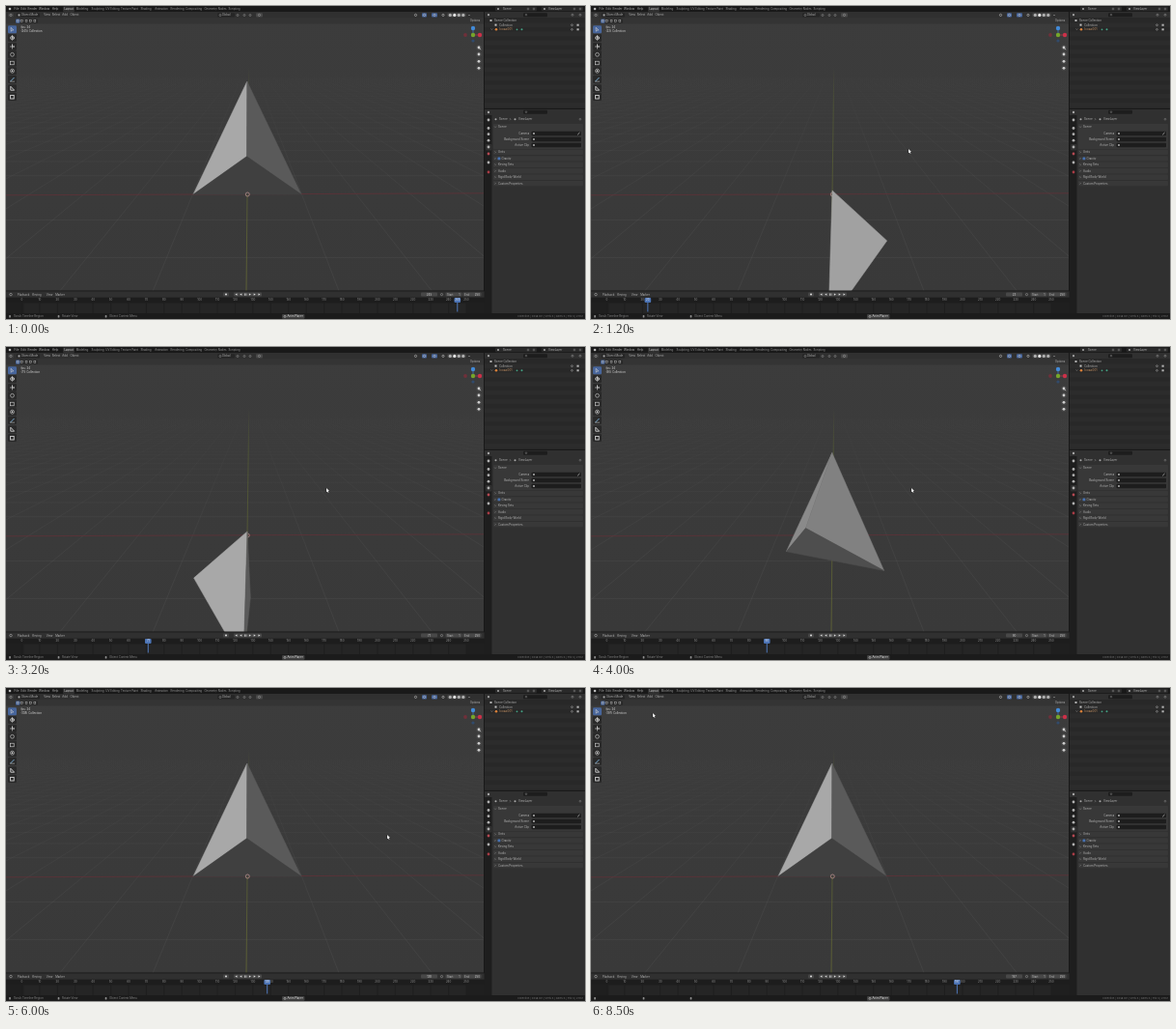
Recreate the animation shown at these times as an HTML page with a canvas. Size 600 by 324 pixels, loop 8.6 s.

```html
<!DOCTYPE html>
<html lang="en">
<head>
<meta charset="utf-8">
<title>Spinning pyramid in a 3D editor</title>
<style>
  html, body { margin: 0; width: 100%; height: 100%; overflow: hidden; background: #1b1b1b; }
  canvas { display: block; width: 600px; height: 324px; }
</style>
</head>
<body>
<canvas id="stage" width="600" height="324"></canvas>
<script>
const ctx = document.getElementById('stage').getContext('2d');
const LOOP = 8600, STEP = 100;
const FOCAL = 344, PITCH = 16 * Math.PI / 180;
const SIN = Math.sin(PITCH), COS = Math.cos(PITCH);

// ---------- drawing helpers ----------
const grey = v => `rgb(${v},${v},${v})`;

function box(x, y, w, h, color, radius = 0) {
  ctx.fillStyle = color;
  ctx.beginPath();
  ctx.roundRect(x, y, w, h, radius);
  ctx.fill();
}

function dot(x, y, r, color) {
  ctx.fillStyle = color;
  ctx.beginPath();
  ctx.arc(x, y, r, 0, 7);
  ctx.fill();
}

function ring(x, y, r, color, width = 0.6) {
  ctx.strokeStyle = color;
  ctx.lineWidth = width;
  ctx.beginPath();
  ctx.arc(x, y, r, 0, 7);
  ctx.stroke();
}

function line(points, color, width = 0.6) {
  ctx.strokeStyle = color;
  ctx.lineWidth = width;
  ctx.beginPath();
  points.forEach(([x, y]) => ctx.lineTo(x, y));
  ctx.stroke();
}

function text(str, x, y, color = '#b4b4b4', align = 'left', size = 2.9) {
  ctx.font = `${size}px Inter, "DejaVu Sans", sans-serif`;
  ctx.textAlign = align;
  ctx.textBaseline = 'middle';
  ctx.fillStyle = color;
  ctx.fillText(str, x, y);
}

// Each item is [label, centre x]
const labels = (items, y, color) => items.forEach(([str, x]) => text(str, x, y, color, 'center'));

// ---------- scene ----------
// x right, y up, z towards the viewer, measured from the 3D cursor
function project([x, y, z]) {
  const k = FOCAL / (FOCAL - y * SIN - z * COS);
  return [252 + (x - 2) * k, 152 - (y * COS - z * SIN - 43) * k];
}

const apex = [0, 114.6, 0], left = [-56, 0, 0], right = [56, 0, 0], front = [0, 58.5, 58.5];
const faces = [
  { points: [apex, left, front], azimuth: -65 },
  { points: [apex, front, right], azimuth: 65 },
  { points: [apex, right, left], azimuth: 180 },
  { points: [left, right, front], under: true },
];

function shade(face, yaw) {
  if (face.under) return 64 + 36 * Math.abs(Math.sin(yaw * Math.PI / 180));
  const facing = Math.cos((face.azimuth + yaw + 25) * Math.PI / 180);
  return Math.min(168, 90 + 103 * Math.max(0, facing));
}

function drawPyramid(frame) {
  const active = Math.min(frame, 96);
  const yaw = active * 3.75, angle = yaw * Math.PI / 180;
  const drop = 115 * (1 - Math.abs(1 - (active % 48) / 24));
  const place = ([x, y, z]) => project([
    x * Math.cos(angle) + z * Math.sin(angle),
    y - drop,
    z * Math.cos(angle) - x * Math.sin(angle),
  ]);
  for (const face of faces) {
    const [a, b, c] = face.points.map(place);
    const turn = (b[0] - a[0]) * (c[1] - a[1]) - (b[1] - a[1]) * (c[0] - a[0]);
    if (turn >= 0) continue;
    ctx.fillStyle = grey(Math.round(shade(face, yaw)));
    ctx.beginPath();
    [a, b, c].forEach(p => ctx.lineTo(...p));
    ctx.closePath();
    ctx.fill();
    ctx.strokeStyle = ctx.fillStyle;
    ctx.lineWidth = 0.5;
    ctx.stroke();
  }
}

function drawGround() {
  const fade = ctx.createLinearGradient(0, 62, 0, 230);
  fade.addColorStop(0, 'rgba(88,88,88,0)');
  fade.addColorStop(0.35, 'rgba(88,88,88,0.18)');
  fade.addColorStop(1, 'rgba(88,88,88,0.45)');
  for (let n = -36; n <= 36; n++) {
    const p = n * 56.5;
    if (n) line([project([p, 0, -2600]), project([p, 0, 270])], fade, 0.6);
    if (n && p < 270) line([project([-2600, 0, p]), project([2600, 0, p])], fade, 0.6);
  }
  line([[0, 195.8], [495, 193.8]], '#603238', 0.8);
  const green = ctx.createLinearGradient(0, 62, 0, 295);
  green.addColorStop(0, 'rgba(92,102,48,0)');
  green.addColorStop(0.2, 'rgba(92,102,48,0.65)');
  green.addColorStop(1, 'rgba(104,108,52,0.95)');
  line([[251.8, 62], [250, 195], [249, 295]], green, 0.8);
}

function drawCursor3D() {
  ring(250.3, 195, 2, '#c0b4b0', 0.6);
  ctx.setLineDash([1, 1]);
  ring(250.3, 195, 2, '#a84a48', 0.5);
  ctx.setLineDash([]);
}

function drawViewport(frame) {
  ctx.save();
  ctx.beginPath();
  ctx.rect(0, 6, 495, 289);
  ctx.clip();
  const back = ctx.createLinearGradient(0, 6, 0, 295);
  back.addColorStop(0, '#3c3c3c');
  back.addColorStop(1, '#393939');
  ctx.fillStyle = back;
  ctx.fillRect(0, 6, 495, 289);
  drawGround();
  const resting = frame >= 96;
  if (!resting) drawCursor3D();
  drawPyramid(frame);
  if (resting) drawCursor3D();
  ctx.restore();
}

// ---------- interface ----------
function drawViewportUI(frame) {
  box(0, 6, 495, 6.5, '#303030');
  box(0, 12.5, 495, 6, 'rgba(48,48,48,0.65)');
  box(2, 7.3, 6, 4.2, '#3c3c3c', 1);
  ring(5, 9.4, 1.1, '#b0b0b0', 0.5);
  box(11, 7.3, 24, 4.2, '#252525', 1);
  box(12.5, 8.4, 2, 2, '#a8a8a8');
  labels([['Object Mode', 24.5], ['View', 42.5], ['Select', 52], ['Add', 61], ['Object', 71]], 9.5);
  box(219, 7.3, 18, 4.2, '#262626', 1);
  text('Global', 228, 9.5, '#b4b4b4', 'center');
  for (const x of [222, 240, 247, 253]) ring(x, 9.5, 1, '#9a9a9a', 0.5);
  box(259, 7.3, 7, 4.2, '#484848', 1);
  ring(262.5, 9.4, 1.1, '#aaa', 0.5);

  box(431, 7.3, 5, 4.2, '#47659b', 1);
  box(441, 7.3, 6, 4.2, '#47659b', 1);
  for (const x of [424.5, 433.5, 444, 453]) ring(x, 9.4, 1.1, '#c4c4c4', 0.6);
  box(457.5, 7.3, 19, 4.2, '#484848', 1);
  for (let i = 0; i < 4; i++) dot(460.3 + i * 4.5, 9.4, 1.6, i === 1 ? '#e6e6e6' : '#b0b0b0');
  line([[479, 9], [480, 10], [481, 9]], '#aaa', 0.5);
  text('Options', 486, 15.5, '#b4b4b4', 'center');

  box(10, 13.5, 23, 4.2, '#272727', 1);
  box(10, 13.5, 4.5, 4.2, '#47659b', 1);
  for (let i = 0; i < 5; i++) {
    ctx.strokeStyle = '#b8b8b8';
    ctx.lineWidth = 0.5;
    ctx.strokeRect(11.3 + i * 4.4, 14.6, 1.9, 1.9);
  }
  text('fps: 24', 15.5, 22.2, '#dedede');
  text(`(${frame}) Collection`, 15.5, 26.4, '#dedede');

  // Tool shelf
  [24.3, 33, 42, 50.3, 58.8, 67.2, 76, 85.2, 94].forEach((y, i) => {
    box(2, y - 4, 9, 8, i ? '#292929' : '#47659b', 1.3);
    const bright = '#d4d4d4';
    if (i === 0) line([[5, y - 2], [7.8, y + 0.6], [6.3, y + 0.7], [5.3, y + 2], [5, y - 2]], bright);
    else if (i === 1 || i === 3) ring(6.5, y, 1.9, bright);
    if (i === 1 || i === 2) line([[4, y], [9, y], [6.5, y], [6.5, y - 2.5], [6.5, y + 2.5]], bright);
    if (i === 4 || i === 8) {
      ctx.strokeStyle = bright;
      ctx.strokeRect(4.6, y - 1.6, 3.6, 3.6);
    }
    if (i === 5) { ring(6.5, y, 2, bright); dot(6.5, y, 0.9, bright); }
    if (i === 6) line([[4.6, y + 2], [8.5, y - 2]], '#79a9cf', 1);
    if (i === 6) line([[4, y + 2.2], [9, y + 2.2]], bright, 0.5);
    if (i === 7) line([[4.8, y - 2], [4.8, y + 2], [8.6, y + 2], [4.8, y - 2]], bright, 0.9);
  });

  // Navigation gizmo
  line([[484, 30], [484, 23]], '#3f76b9', 0.8);
  line([[484, 30], [491, 30]], '#a93648', 0.8);
  dot(476, 30, 1.9, '#70303a');
  dot(484, 36, 1.6, '#314b6c');
  dot(484, 23, 2.2, '#438bd8');
  dot(491, 30, 2.2, '#cb3149');
  dot(484, 30, 2.2, '#76a52b');
  for (const y of [43, 50, 57.3, 64.3]) {
    dot(490, y, 3, '#454545');
    dot(490, y, 1.4, '#d0d0d0');
  }
  line([[490.5, 43.5], [492, 45.3]], '#d0d0d0', 0.8);
}

function drawTopBar() {
  box(0, 0, 600, 6, '#191919');
  dot(4, 3, 1.3, '#b9b9b9');
  labels([['File', 11], ['Edit', 18], ['Render', 27.5], ['Window', 39.5], ['Help', 51]], 3);
  box(59, 0.6, 12, 5.4, '#303030', 1);
  text('Layout', 65, 3.2, '#e3e3e3', 'center');
  labels([['Modeling', 79], ['Sculpting', 95], ['UV Editing', 110.5], ['Texture Paint', 128],
    ['Shading', 145], ['Animation', 161], ['Rendering', 177.5], ['Compositing', 194.5],
    ['Geometry Nodes', 217], ['Scripting', 236.5]], 3.2, '#969696');
  box(507, 0.8, 43, 4.4, '#292929', 1);
  box(555, 0.8, 43, 4.4, '#292929', 1);
  dot(510, 3, 1, '#aaa');
  dot(558, 3, 1, '#aaa');
  text('Scene', 515, 3);
  text('ViewLayer', 562, 3);
  for (const x of [541, 547, 589, 595]) ring(x, 3, 0.9, '#8c8c8c', 0.5);
}

function drawOutliner() {
  box(496, 6, 104, 100, '#282828');
  for (let y = 17.4; y < 104; y += 9.2) box(496, y, 104, 4.6, '#2c2c2c');
  box(496, 6, 104, 6, '#303030');
  dot(500, 9.2, 1.1, '#a6a6a6');
  box(536, 7.2, 25, 4, '#1d1d1d', 1);
  ring(539, 9.1, 0.8, '#888', 0.5);
  ring(587, 9.2, 1, '#a0a0a0', 0.5);
  ring(595, 9.2, 1, '#a0a0a0', 0.5);
  box(501.5, 14, 2, 2, '#b5b5b5');
  text('Scene Collection', 506, 15.1);
  box(506.5, 18.6, 2, 2, '#c5c5c5');
  text('Collection', 511, 19.7);
  line([[502.5, 23.5], [503.4, 24.5], [504.3, 23.5]], '#999', 0.5);
  dot(508, 24.3, 1.3, '#db8139');
  text('Icosa.001', 511.5, 24.4, '#d29a68');
  dot(529.5, 24.3, 0.9, '#43a385');
  dot(534.5, 24.3, 1, '#43a385');
  for (const y of [19.7, 24.3]) {
    ring(586.5, y, 0.9, '#b5b5b5', 0.5);
    box(591.5, y - 1, 2.2, 2, '#b5b5b5');
  }
}

function drawProperties() {
  box(496, 106, 104, 212, '#303030');
  box(496, 106, 104, 1, '#191919');
  box(496, 113, 7.5, 205, '#1e1e1e');
  dot(500, 110, 1.2, '#a5a5a5');
  box(536, 107.8, 25, 4, '#1d1d1d', 1);
  ring(539, 109.7, 0.8, '#888', 0.5);
  box(497, 143, 6.5, 6.5, '#303030', 1);
  [118, 126.5, 132.7, 139.2, 146, 153, 162, 172].forEach((y, i) =>
    dot(500, y, 1.4, i === 5 ? '#b54852' : i === 7 ? '#a93b45' : '#b0b0b0'));
  dot(507.5, 117.2, 1, '#aaa');
  text('Scene', 511, 117.2);
  line([[522, 116.2], [523, 117.2], [522, 118.2]], '#999', 0.5);
  dot(527.5, 117.2, 1, '#aaa');
  text('ViewLayer', 531, 117.2);
  ring(595, 117.2, 0.9, '#888', 0.5);

  box(505, 122, 93, 26, '#383838', 1);
  text('Scene', 510, 125);
  line([[506.2, 124.6], [507.1, 125.6], [508, 124.6]], '#999', 0.5);
  [['Camera', 132], ['Background Scene', 138], ['Active Clip', 144]].forEach(([name, y], i) => {
    text(name, 542, y, '#b4b4b4', 'right');
    box(544.5, y - 2.3, 51.5, 4.5, '#1d1d1d', 1);
    dot(547, y, 0.9, '#c2c2c2');
    if (!i) line([[592.3, y + 1.2], [594.5, y - 1]], '#c2c2c2', 0.8);
  });
  ['Units', 'Gravity', 'Keying Sets', 'Audio', 'Rigid Body World', 'Custom Properties'].forEach((name, i) => {
    const y = 151.4 + i * 6.45;
    box(505, y - 2.7, 93, 5.4, '#383838', 1);
    line([[506.5, y - 0.9], [507.4, y], [506.5, y + 0.9]], '#999', 0.5);
    if (i === 1) box(509.5, y - 1.4, 2.8, 2.8, '#4772b3', 0.6);
    text(name, i === 1 ? 513.5 : 510, y);
  });
}

function drawTimeline(frame) {
  const frameX = n => 16.5 + n * 1.842;
  box(0, 295, 495.5, 23, '#252525');
  box(0, 294.6, 495.5, 0.8, '#191919');
  box(0, 295.4, 495.5, 6.4, '#303030');
  box(0, 301.8, 495.5, 5.6, '#1d1d1d');
  box(0, 307.4, frameX(1), 10.6, '#1f1f1f');
  box(frameX(250), 307.4, 495.5 - frameX(250), 10.6, '#1f1f1f');
  ring(5, 298.6, 1.3, '#aaa', 0.6);
  labels([['Playback', 18], ['Keying', 32], ['View', 45], ['Marker', 56]], 298.7);
  box(225, 296.6, 6, 4, '#454545', 1);
  dot(228, 298.6, 1, '#dedede');
  box(236, 296.6, 29, 4, '#484848', 1);
  for (let i = 0; i < 6; i++) {
    const x = 238.5 + i * 4.8, dir = i < 3 ? -1 : 1;
    if (i === 2) { box(x - 1, 297.5, 0.7, 2.3, '#ddd'); box(x + 0.5, 297.5, 0.7, 2.3, '#ddd'); continue; }
    ctx.fillStyle = '#dcdcdc';
    ctx.beginPath();
    [[-dir, -1.2], [dir, 0], [-dir, 1.2]].forEach(([dx, dy]) => ctx.lineTo(x + dx, 298.6 + dy));
    ctx.fill();
  }
  box(430, 296.6, 17, 4, '#484848', 1);
  text(frame, 438.5, 298.7, '#d4d4d4', 'center');
  ring(451.5, 298.6, 1.1, '#aaa', 0.5);
  box(455.5, 296.6, 17, 4, '#484848', 1);
  box(473.5, 296.6, 19, 4, '#484848', 1);
  text('Start', 457, 298.7);
  text('1', 470.5, 298.7, '#d0d0d0', 'right');
  text('End', 475, 298.7);
  text('250', 491, 298.7, '#d0d0d0', 'right');
  for (let n = 0; n <= 250; n += 10) {
    line([[frameX(n), 307.4], [frameX(n), 318]], '#1e1e1e', 0.7);
    text(n, frameX(n), 304.6, '#929292', 'center');
  }
  const x = frameX(frame);
  line([[x, 306], [x, 316.5]], '#4f78bb', 1);
  box(x - 3.3, 302, 6.6, 5, '#4c74b6', 1);
  text(frame, x, 304.6, '#f0f0f0', 'center');
}

function drawStatus(time) {
  box(0, 318, 600, 6, '#1b1b1b');
  for (const x of [4, 54.5, 103.5]) box(x - 0.8, 320, 1.7, 2.6, '#919191', 0.7);
  if (time < 6800) {
    text('Scrub Timeline Region', 8, 321.4, '#878787');
    text('Rotate View', 58, 321.4, '#878787');
    text('Object Context Menu', 107, 321.4, '#878787');
  }
  box(286, 319, 23.5, 4.7, '#414141', 1);
  ring(289, 321.4, 1, '#ddd', 0.5);
  text('Anim Player', 291.5, 321.4, '#e2e2e2');
  text('Collection | Icosa.001 | Verts:4 | Faces:4 | Tris:4 | 2.93.1', 598, 321.4, '#777', 'right', 2.6);
}

// ---------- pointer ----------
const pointerPath = [
  [400, 536, 170], [900, 330, 150], [1300, 330, 150], [1600, 333, 148],
  [4900, 333, 148], [5300, 396, 154], [7700, 396, 154], [8400, 65, 28], [8600, 65, 28],
];

function drawPointer(time) {
  const next = pointerPath.findIndex(([at]) => at > time);
  if (next < 1) return;
  const [t0, x0, y0] = pointerPath[next - 1], [t1, x1, y1] = pointerPath[next];
  const p = (time - t0) / (t1 - t0), ease = p * p * (3 - 2 * p);
  const x = x0 + (x1 - x0) * ease, y = y0 + (y1 - y0) * ease;
  ctx.fillStyle = '#fff';
  ctx.strokeStyle = '#161616';
  ctx.lineWidth = 0.8;
  ctx.beginPath();
  [[0, -2], [0, 2.3], [1, 1.5], [1.8, 2.9], [2.4, 2.5], [1.8, 1.2], [2.9, 1.1]]
    .forEach(([dx, dy]) => ctx.lineTo(x - 0.9 + dx, y + dy));
  ctx.closePath();
  ctx.stroke();
  ctx.fill();
}

function render() {
  const time = Math.floor(performance.now() % LOOP / STEP) * STEP;
  const played = Math.floor(time * 0.0238 - 4.78);
  const frame = (played + 249) % 250 + 1;
  box(0, 0, 600, 324, '#191919');
  drawViewport(frame);
  drawViewportUI(frame);
  drawTopBar();
  drawOutliner();
  drawProperties();
  drawTimeline(frame);
  drawStatus(time);
  drawPointer(time);
  requestAnimationFrame(render);
}
render();
</script>
</body>
</html>
```
